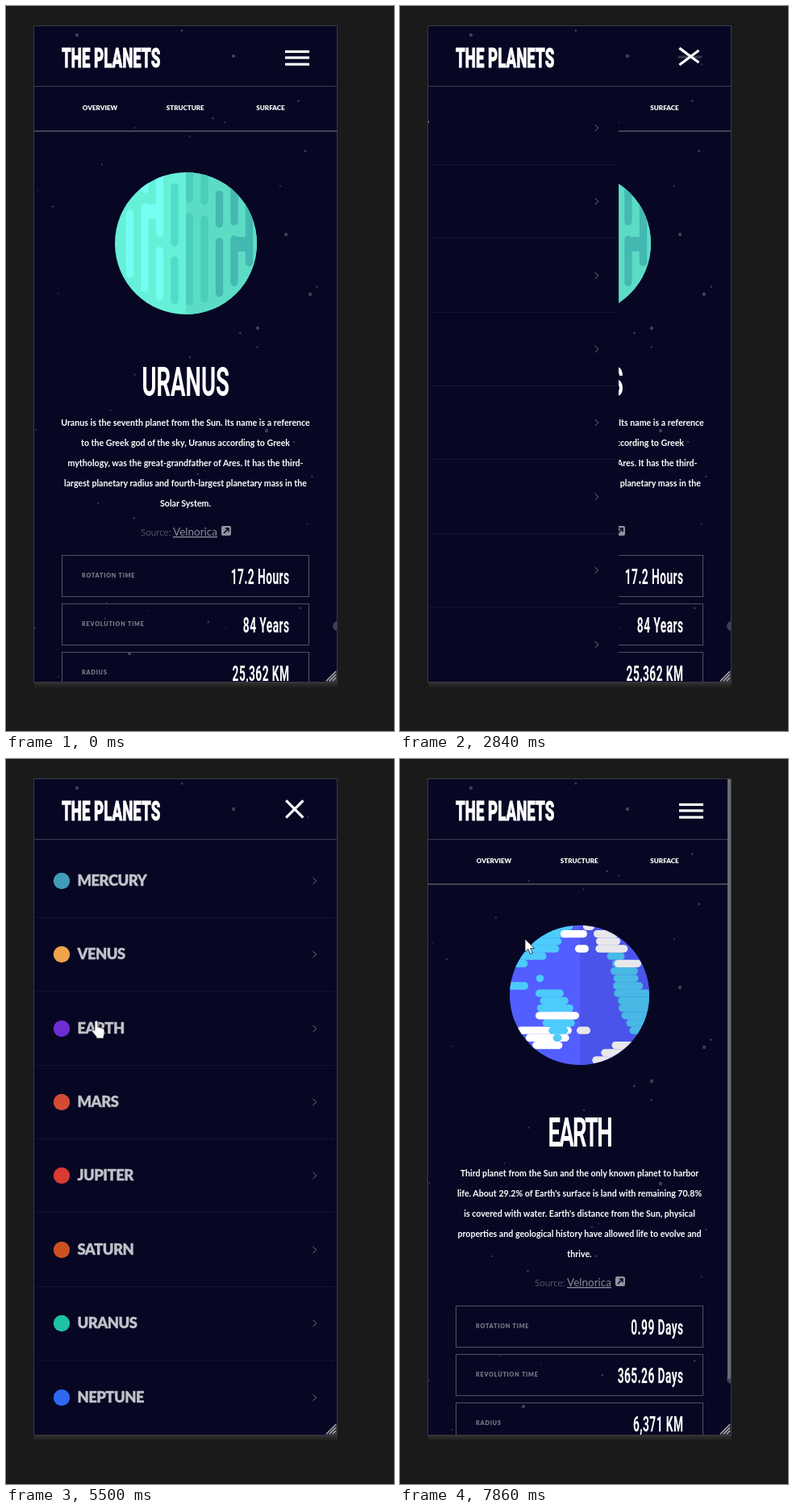
An HTML page that plays this animation: 481x898 px, repeating every 8000 ms.

```html
<!DOCTYPE html>
<html lang="en">
<head>
<meta charset="utf-8">
<title>The Planets</title>
<style>
  html, body { margin: 0; width: 100%; height: 100%; overflow: hidden; background: #1a1a1a; }
  svg { display: block; width: 100%; height: 100%; }
  text { font-family: Lato, "Open Sans", sans-serif; fill: #fff; }
  .narrow { font-family: Roboto, "Liberation Sans", sans-serif; font-weight: 700; }
  .mid { text-anchor: middle; }
  .end { text-anchor: end; }
  .logo { font-size: 34px; font-weight: 900; stroke: #fff; stroke-width: .8px; }
  .title { font-size: 50px; }
  .tight { letter-spacing: -3.2px; }
  .value { font-size: 25px; letter-spacing: .8px; }
  .tab { font-size: 8.1px; font-weight: 900; }
  .body { font-size: 10.65px; font-weight: 700; }
  .label { font-size: 7.1px; font-weight: 900; letter-spacing: .85px; fill: #7d7d89; }
  .source { font-size: 11.8px; font-weight: 300; fill: #85858f; }
  .link { font-size: 13.5px; fill: #8b8b96; text-decoration: underline; }
  .item { font-size: 18.4px; font-weight: 900; letter-spacing: -.55px; fill: #c1c1c8; stroke: #c1c1c8; stroke-width: .3px; }
</style>
</head>
<body>
<svg id="stage" viewBox="0 0 481 898" xmlns="http://www.w3.org/2000/svg"></svg>
<script>
const LOOP = 8000, NARROW = 0.55, NIGHT = '#070724';
const OPEN = 2380, CLOSE = 6226;

const planets = [
  ['MERCURY', '#3f9db8'], ['VENUS', '#efa34b'], ['EARTH', '#6d2ed5'], ['MARS', '#d14c32'],
  ['JUPITER', '#d83a34'], ['SATURN', '#cd5120'], ['URANUS', '#1ec2a4'], ['NEPTUNE', '#2d68f0']
];

let seed = 7;
const rand = () => (seed = (seed * 16807) % 2147483647) / 2147483647;
const times = (n, fn) => Array.from({ length: n }, (_, i) => fn(i)).join('');

const narrow = (x, y, cls, str) =>
  `<text class="narrow ${cls}" transform="translate(${x} ${y}) scale(${NARROW} 1)">${str}</text>`;
const text = (x, y, cls, str) => `<text class="${cls}" x="${x}" y="${y}">${str}</text>`;
const rect = (x, y, w, h, fill) => `<rect x="${x}" y="${y}" width="${w}" height="${h}" fill="${fill}"/>`;
const dot = (x, y, r) => `<circle cx="${x}" cy="${y}" r="${r}"/>`;
const hline = (x1, x2, y, color, w = 1) =>
  `<path d="M${x1} ${y}H${x2}" stroke="${color}" stroke-width="${w}"/>`;
const bar = (d, color) =>
  `<path d="${d}" stroke="${color}" stroke-width="9.3" stroke-linecap="round"/>`;

// A few bright stars, the rest scattered
const sky = [[88, 36], [282, 62], [347, 283], [377, 357], [312, 399], [323, 526], [153, 802]]
  .map(([x, y]) => dot(x, y, 2.2)).join('') + dot(411, 768, 6) +
  times(44, () => dot(36 + rand() * 372, 28 + rand() * 806, .7 + rand() * .7));

function globe(id, cx, cy, r, left, right, art) {
  return `<clipPath id="${id}">${dot(cx, cy, r)}</clipPath>
    <g clip-path="url(#${id})">${rect(cx - r, cy - r, r * 2, r * 2, left)}
    ${rect(223, cy - r, r + 2, r * 2, right)}${art}</g>`;
}

// Nine columns that follow the globe's outline, most of them split by a gap
function uranusArt() {
  const gaps = [0, 238, 292, 304, 250, 253, 281, 278, 0];
  const shades = ['#74fff2', '#4fdcc8', '#49cfbb', '#43b9b1'];
  return gaps.map((gap, i) => {
    const x = 153.5 + 18.5 * i, half = Math.sqrt(88 ** 2 - (x - 223) ** 2);
    const color = shades[i < 3 ? 0 : i < 4 ? 1 : i < 6 ? 2 : 3];
    const top = 294 - half + (i % 3 ? -6 : 17), bottom = 294 + half - 16;
    const split = gap ? `V${gap - 11}M${x} ${gap + 11}` : '';
    const link = i % 6 === 1 ? rect(x + 4, gap + 8, 11, 18, color) : '';
    return bar(`M${x} ${top}${split}V${bottom}`, color) + link;
  }).join('');
}

const strip = (color, row, x1, x2) =>
  bar(`M${x1 + 4.6} ${207.4 + row * 9.2}H${x2 - 4.6}`, color);
const land = (color, row, n, left, right) => times(n, k =>
  strip(color, row + k, left(k) + rand() * 8 - 4, right(k) + rand() * 8 - 4));

function earthArt() {
  const sea = '#4dcbfb', shaded = '#48b8e4', ice = '#fff', dim = '#e8e8ec';
  return land(sea, 0, 6, () => 120, k => 212 - 2 * k * k) +
    strip(sea, 7, 169, 178) + strip(sea, 8, 125, 159) +
    land(ice, 14, 3, k => 142 + 10 * k, k => 210 - 4 * k) +
    land(sea, 9, 7, k => 170 + .5 * k * k, k => 201 + 17 * Math.sin(k * Math.PI / 6)) +
    strip(ice, 12, 168, 222) + strip(ice, 1, 199, 232) + strip(ice, 3, 217, 234) +
    land(shaded, 4, 11, k => 259 + .25 * k * k, k => 280 + 6 * k) +
    strip(dim, 0, 227, 241) + land(dim, 1, 3, k => 238 + 3 * k, k => 272 + 5 * k) +
    strip(dim, 5, 266, 299) + strip(dim, 14, 219, 236) +
    land(dim, 16, 3, k => 265 - 14 * k, () => 295);
}

function page(id, dy, art, title, cls, lines, values) {
  const rows = ['ROTATION TIME', 'REVOLUTION TIME', 'RADIUS'].map((label, i) => {
    const y = i * 60;
    return `<rect x="69.5" y="${680.5 + y}" width="306" height="51" fill="none" stroke="#50505f"/>` +
      text(94, 708 + y, 'label', label) + narrow(351.5, 716 + y, 'value end', values[i]);
  }).join('');
  return `<g id="${id}">${art}<g transform="translate(0 ${dy})">
    <g id="${id}Title">${narrow(222.7, 482.6, 'title mid ' + cls, title)}</g>
    ${lines.map((s, i) => text(222.5, 519.5 + i * 25, 'body mid', s)).join('')}
    ${text(167, 656, 'source', 'Source:')}${text(207, 656, 'link', 'Velnorica')}
    <rect x="267" y="644" width="12" height="12" rx="2" fill="#92929b"/>
    <path d="M270 653L275.5 647.5M271.8 647H276V651.2" fill="none" stroke="${NIGHT}" stroke-width="1.6"/>
    ${rows}</g></g>`;
}

const uranus = page('uranus', 0, globe('uClip', 223, 294, 88, '#66f0d8', '#5ddcc5', uranusArt()), 'URANUS', '', [
  'Uranus is the seventh planet from the Sun. Its name is a reference',
  'to the Greek god of the sky, Uranus according to Greek',
  'mythology, was the great-grandfather of Ares. It has the third-',
  'largest planetary radius and fourth-largest planetary mass in the',
  'Solar System.'
], ['17.2 Hours', '84 Years', '25,362 KM']);

const earth = page('earth', -3, globe('eClip', 222.5, 292.5, 86.5, '#525eff', '#4b54ea', earthArt()), 'EARTH', 'tight', [
  'Third planet from the Sun and the only known planet to harbor',
  'life. About 29.2% of Earth\'s surface is land with remaining 70.8%',
  'is covered with water. Earth\'s distance from the Sun, physical',
  'properties and geological history have allowed life to evolve and',
  'thrive.'
], ['0.99 Days', '365.26 Days', '6,371 KM']);

const menu = planets.map(([name, color], i) => {
  const y = Math.round(151 + i * 91.37);
  return `<g fill="${color}">${dot(69, y, 10.2)}</g>` + text(88.5, y + 5.5, 'item', name) +
    `<path d="M380.5 ${y - 4}l4.3 4-4.3 4" fill="none" stroke="#747482"/>` +
    (i < 7 ? hline(35, 410, y + 45.5, '#131330') : '');
}).join('');

const tabs = ['OVERVIEW', 'STRUCTURE', 'SURFACE']
  .map((name, i) => text(116.5 + 105.75 * i, 129, 'tab mid', name)).join('');

const stage = document.getElementById('stage');
stage.innerHTML = `
  <defs>
    <clipPath id="screen"><rect x="35" y="25" width="375" height="812"/></clipPath>
    <linearGradient id="shade" x2="0" y2="1"><stop stop-color="#353536"/><stop offset="1" stop-color="#1a1a1a"/></linearGradient>
    <radialGradient id="touch"><stop stop-color="#66667a" stop-opacity=".04"/><stop offset="1" stop-color="#77778a" stop-opacity=".26"/></radialGradient>
  </defs>
  ${rect(0, 0, 481, 898, '#1a1a1a')}${rect(35, 837, 376, 8, 'url(#shade)')}
  <rect x="34.5" y="24.5" width="376" height="813" fill="${NIGHT}" stroke="#3a3a41"/>
  <g clip-path="url(#screen)">
    <g fill="#fff" opacity=".22">${sky}</g>
    ${tabs}${hline(35, 410, 155, '#444455', 2)}
    ${uranus}${earth}
    <g id="menu">${rect(35, 100, 375, 737, NIGHT)}${menu}</g>
    ${hline(35, 410, 99.5, '#3c3c4c')}
    ${narrow(69, 76, 'logo', 'THE PLANETS')}
    <g stroke="#fff" stroke-width="3.2">
      <path id="middle" d="M346 64H376"/><path id="top" d="M-15 0H15"/><path id="bottom" d="M-15 0H15"/>
    </g>
    <rect id="scroll" x="406" y="20" width="4" height="748" rx="2" fill="#6c6c77"/>
  </g>
  <path d="M396 837L410 823V837Z" fill="#33333d"/>
  <path d="M397 836L409 824M401 836L409 828M405 836L409 832" stroke="#b4b4b8" stroke-width="1.2"/>
  <circle id="tap" r="22" fill="url(#touch)"/>
  <g id="cursor" fill="#fff" stroke="#15151c" stroke-width=".8" stroke-linejoin="round">
    <path id="arrow" d="M0 0V16L4 12.5 6.5 18.5 9.2 17.3 6.6 11.5H11.5Z"/>
    <path id="hand" d="M-2 2a2 2 0 0 1 4 0v6l6 1.5q2 .7 2 3v3q0 2-1 4v2.5h-9v-2l-5-6q-1.5-2 .3-2.8 1.3-.5 2.7 1.3z"/>
  </g>`;

const el = {};
stage.querySelectorAll('[id]').forEach(n => el[n.id] = n);
const show = (node, on) => node.setAttribute('visibility', on ? 'visible' : 'hidden');
const move = (node, x, y, turn = 0) => node.setAttribute('transform', `translate(${x} ${y}) rotate(${turn})`);
const clamp = v => Math.min(1, Math.max(0, v));
const smooth = v => v * v * (3 - 2 * v);

function bezier(x1, y1, x2, y2) {
  const at = (s, a, b) => 3 * (1 - s) * (1 - s) * s * a + 3 * (1 - s) * s * s * b + s * s * s;
  return x => {
    let lo = 0, hi = 1;
    for (let i = 0; i < 24; i++) {
      const m = (lo + hi) / 2;
      if (at(m, x1, x2) < x) lo = m; else hi = m;
    }
    return at((lo + hi) / 2, y1, y2);
  };
}
const ease = bezier(.25, .1, .25, 1), easeInOut = bezier(.42, 0, .58, 1);
const toggled = (t, dur, fn) => fn(clamp((t - OPEN) / dur)) - fn(clamp((t - CLOSE) / dur));

// Pointer visits: each is a run of [time, x, y]
const visits = [
  [[330, 413, 878], [670, 364, 370], [870, 364, 370], [1420, 357, 64], [2350, 357, 64]],
  [[3470, 358, 52], [3600, 331, 80], [4010, 137, 140], [4480, 137, 140], [4820, 125.5, 251],
   [5240, 115, 303], [5500, 112, 324], [6160, 112, 324]],
  [[7400, 112, 325], [7510, 117, 332], [7650, 117, 332], [7860, 155, 223], [LOOP, 155, 223]]
];

function pointer(t) {
  const run = visits.find(v => t >= v[0][0] && t < v[v.length - 1][0]);
  if (!run) return null;
  const i = run.findIndex(k => k[0] > t), [t0, x0, y0] = run[i - 1], [t1, x1, y1] = run[i];
  const p = smooth((t - t0) / (t1 - t0));
  return [x0 + (x1 - x0) * p, y0 + (y1 - y0) * p];
}

function draw(t) {
  const slide = toggled(t, 800, easeInOut), cross = toggled(t, 900, ease);
  move(el.menu, -375 * (1 - slide), 0);

  const cx = 361 - 3.2 * cross;
  move(el.top, cx, 56.5 + 5.6 * cross, 45 * cross);
  move(el.bottom, cx, 72.2 - 10.1 * cross, -45 * cross);
  move(el.middle, -2 * cross, -cross);
  el.middle.setAttribute('opacity', 1 - cross);

  const landed = t >= CLOSE;
  show(el.uranus, !landed);
  show(el.earth, landed);
  show(el.scroll, landed);
  el.earthTitle.setAttribute('opacity', clamp((t - 6880) / 500));

  const burgerTap = t >= 2350 && t < 2560, itemTap = t >= 6160 && t < 6500;
  show(el.tap, burgerTap || itemTap);
  if (burgerTap) move(el.tap, 357, 60); else move(el.tap, 111, 324);
  el.tap.setAttribute('opacity', clamp(((burgerTap ? 2560 : 6500) - t) / 80));

  const pos = pointer(t);
  show(el.arrow, false);
  show(el.hand, false);
  if (pos) {
    const [x, y] = pos;
    const overBurger = x > 342 && y < 78, overItem = slide > .9 && y > 100;
    show(overBurger || overItem ? el.hand : el.arrow, true);
    move(el.cursor, x, y);
  }
}

const start = performance.now();
function tick() {
  draw((performance.now() - start) % LOOP);
  requestAnimationFrame(tick);
}
tick();
</script>
</body>
</html>
```
